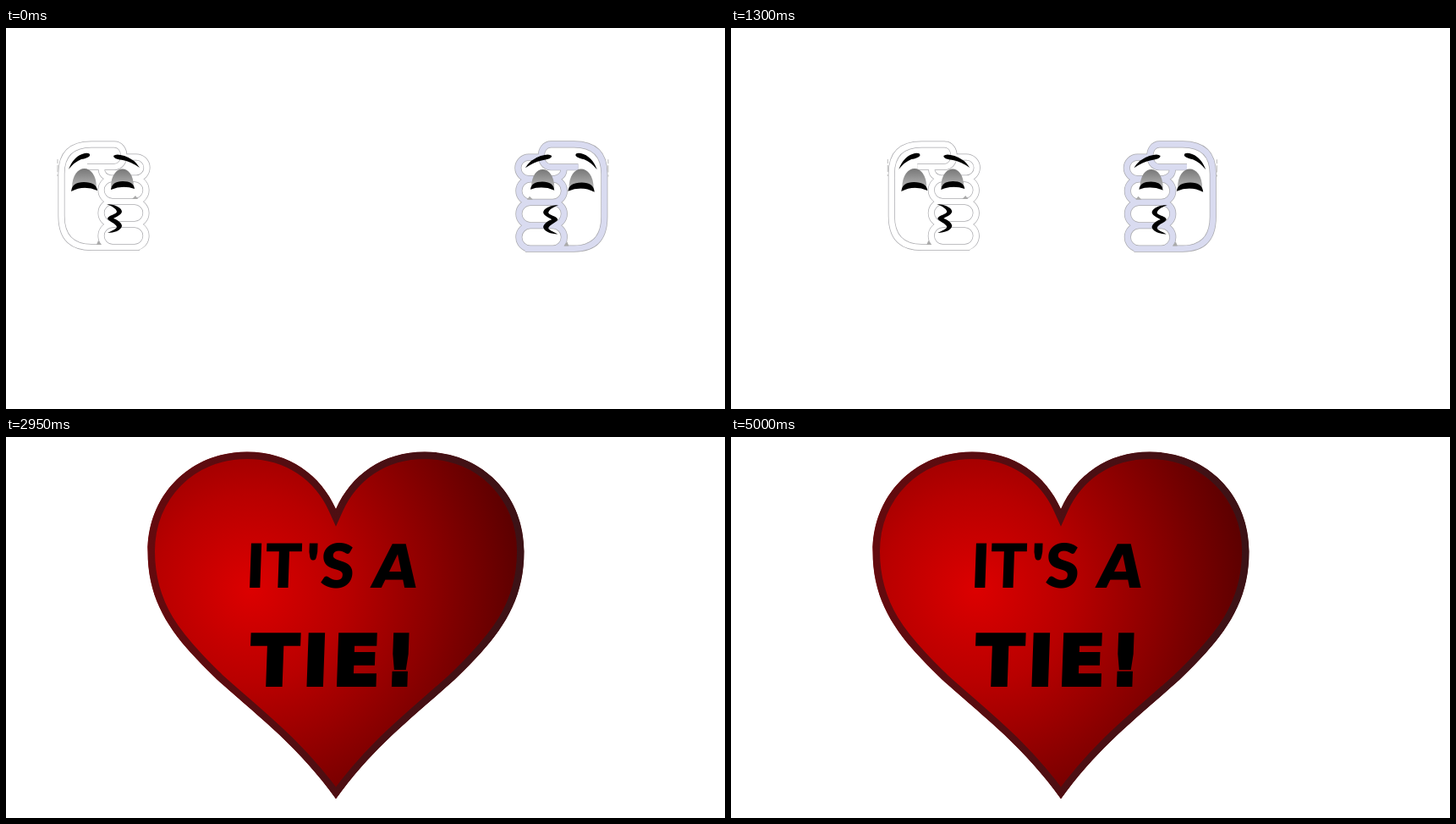
Recreate the animation shown at these times as an HTML page. Size 850 px wide and 450 px high, loop 5050 ms.

```html
<!DOCTYPE html>
<html lang="en">
<head>
<meta charset="utf-8">
<title>It's a tie</title>
<style>
  html, body { margin: 0; width: 100%; height: 100%; overflow: hidden; background: #fff; }
  svg { display: block; width: 850px; height: 450px; }
  .edge, .band { fill: none; stroke-linejoin: round; }
  .edge { stroke: #a9a9ad; stroke-width: 8; }
  .band { stroke-width: 6.6; }
  text { font: 900 72px Lato, sans-serif; }
  .wide { font: bold 71px "DejaVu Sans", sans-serif; }
  .big { font-size: 82px; letter-spacing: 5px; stroke: #000; stroke-width: 4; }
</style>
</head>
<body>
<svg viewBox="0 0 850 450">
  <defs>
    <linearGradient id="lid" x2="0" y2="1">
      <stop stop-color="#777"/><stop offset="1" stop-color="#b8b8b8"/>
    </linearGradient>
    <radialGradient id="red" gradientUnits="userSpaceOnUse" cx="290" cy="180" r="320">
      <stop stop-color="#dc0000"/><stop offset=".35" stop-color="#b80000"/>
      <stop offset=".65" stop-color="#8e0000"/><stop offset="1" stop-color="#5c0000"/>
    </radialGradient>
    <linearGradient id="rim" gradientUnits="userSpaceOnUse" x1="167" x2="613">
      <stop stop-color="#640a0e"/><stop offset=".6" stop-color="#4a0f13"/>
      <stop offset="1" stop-color="#3c1216"/>
    </linearGradient>

    <!-- palm with thumb, first finger, then the three full fingers -->
    <path id="fist" d="M158 259H101Q65.500 259 65.500 222V172Q65.500 137.500 101 137.500H128
      C143 137.500 143 164 128 164H96
      M140 152.500H154A12.500 12.500 0 0 1 154 177.500H123Q113 175 113 167
      M126 178H152A13.500 13.500 0 0 1 152 205H126A13.500 13.500 0 0 1 126 178Z
      M126 205H152A13.500 13.500 0 0 1 152 232H126A13.500 13.500 0 0 1 126 205Z
      M126 232H152A13.500 13.500 0 0 1 152 259H126A13.500 13.500 0 0 1 126 232Z"/>

    <g id="face">
      <path d="M61 155V175" fill="none" stroke="#bbb" stroke-dasharray="5 2 8 3"/>
      <path d="M149 202l4-4 3 4zM107 256l2-5 4 5z" fill="#aaa"/>
      <path d="M78 189C78 159 107 158 107 189Z" fill="url(#lid)"/>
      <path d="M124 188C124 160 151 159 151 188Z" fill="url(#lid)"/>
      <path d="M77 193Q78 182 92 182Q107 182 108 192Q92 185 77 193Z
        M124 191Q125 181 138 181Q151 181 152 190Q138 185 124 191Z
        M74 167Q80 151 93 148Q100 147 99 151Q96 154 89 155Q81 158 74 167Z
        M127 151Q130 148 140 151Q152 155 158 165Q148 158 138 156Q127 155 127 151Z
        M119 208C128 208 137 212 137 217C136 221 130 223 127 225C131 226 137 230 137 234
        C136 239 128 242 120 242C126 239 131 237 131 235C130 231 121 228 120 225
        C121 221 131 220 131 217C130 213 126 211 119 208Z"/>
    </g>

    <path id="heart" d="M390 85C372 45 335 17.500 285 17.500C218 17.500 167.500 68 167.500 135
      C167.500 200 200 239 250 287C300 332 345 365 390 427.500
      C435 365 480 332 530 287C580 239 612.500 200 612.500 135
      C612.500 68 562 17.500 495 17.500C445 17.500 408 45 390 85Z"/>
    <clipPath id="inside"><use href="#heart"/></clipPath>
  </defs>

  <g id="kiss">
    <g id="right">
      <g transform="translate(773.500 -2) scale(-1.010 1.014)">
        <use href="#fist" class="edge"/>
        <use href="#fist" class="band" stroke="#d9dbf0"/>
        <use href="#face"/>
      </g>
    </g>
    <g id="left">
      <use href="#fist" class="edge"/>
      <use href="#fist" class="band" stroke="#fff"/>
      <use href="#face"/>
    </g>
  </g>

  <g id="result">
    <use href="#heart" fill="url(#red)" stroke="url(#rim)" stroke-width="17" clip-path="url(#inside)"/>
    <g transform="translate(0 178) skewX(-2)">
      <text x="283">IT<tspan x="354">'</tspan><tspan x="371">S</tspan></text>
    </g>
    <text class="wide" transform="translate(430 178) skewX(-8)">A</text>
    <text class="wide big" transform="translate(289 293) skewX(-2)">TIE!</text>
  </g>
</svg>
<script>
  const LOOP = 5050, STEP = 50, MEET = 2500;
  const LEFT_SPEED = 0.0956, RIGHT_SPEED = -0.1058; // px per ms
  const el = id => document.getElementById(id);
  const show = (id, on) => el(id).setAttribute("display", on ? "inline" : "none");
  const slide = (id, x) => el(id).setAttribute("transform", `translate(${x})`);

  function draw(now) {
    const t = Math.floor((now % LOOP) / STEP) * STEP;
    show("kiss", t < MEET);
    show("result", t >= MEET);
    slide("left", t * LEFT_SPEED);
    slide("right", t * RIGHT_SPEED);
  }

  function tick() {
    draw(performance.now());
    requestAnimationFrame(tick);
  }
  tick();
</script>
</body>
</html>
```
